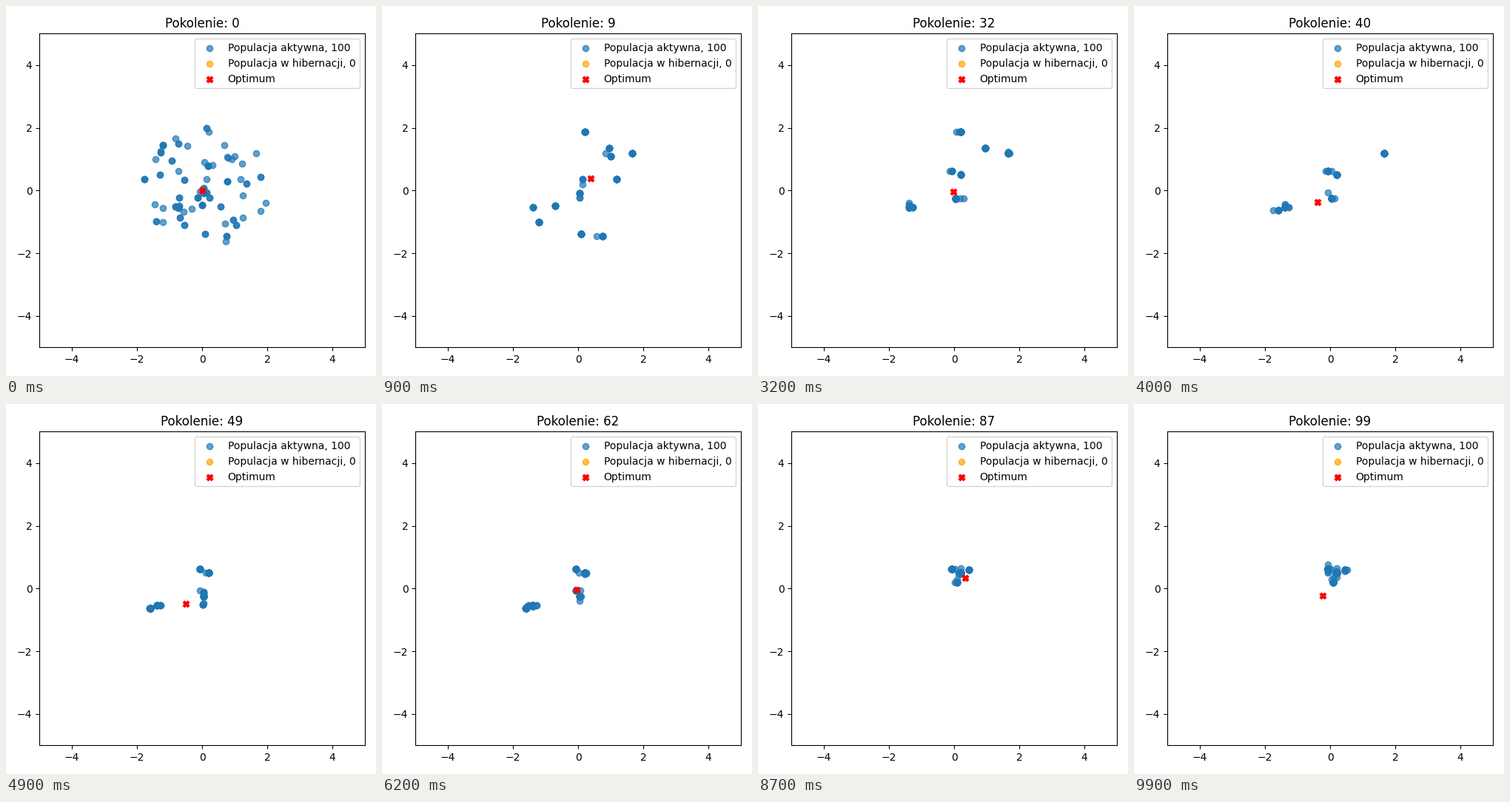
A matplotlib script that plays this animation: 500x500 px, repeating every 10000 ms.

```python
import numpy as np
import matplotlib.pyplot as plt
from matplotlib.animation import FuncAnimation

SIZE = 100          # individuals
GENERATIONS = 100
STRAYS = 49         # founders that soon die out
MOVE, COPY, MUTATE = 0.04, 0.12, 0.02   # chances per individual and generation

# x, y, first generation, generation of extinction
NICHES = np.array([
    (0.20, 1.87, 0, 40), (1.66, 1.19, 0, 42), (1.00, 1.10, 0, 26),
    (0.95, 1.35, 6, 38), (0.14, 0.36, 0, 26), (1.18, 0.36, 0, 18),
    (0.75, -1.45, 0, 16), (0.08, -1.38, 0, 26), (-1.20, -1.00, 0, 26),
    (-0.70, -0.48, 0, 15), (0.05, -0.08, 0, 16), (-1.38, -0.53, 6, 70),
    (0.04, -0.25, 14, 84), (-0.06, 0.62, 16, 100), (0.20, 0.50, 20, 100),
    (-1.59, -0.62, 36, 70), (0.02, -0.50, 43, 58), (-0.18, -0.25, 60, 86),
    (0.45, 0.60, 84, 100), (0.10, 0.20, 82, 100),
])


def scatter_strays(rng):
    r = 2 * rng.random(STRAYS) ** 0.6
    angle = rng.uniform(0, 2 * np.pi, STRAYS)
    end = rng.integers(2, 10, STRAYS)
    return np.column_stack([r * np.cos(angle), r * np.sin(angle), 0 * r, end])


def evolve(seed=7):
    rng = np.random.default_rng(seed)
    niches = np.vstack([NICHES, scatter_strays(rng)])
    spots, (born, dies) = niches[:, :2], niches[:, 2:].T

    founders = np.flatnonzero(born == 0)
    home = np.append(founders, rng.choice(founders, SIZE - len(founders)))
    pop = spots[home]
    history = [pop.copy()]
    for gen in range(1, GENERATIONS):
        alive = np.flatnonzero((born <= gen) & (gen < dies))
        for i in range(SIZE):
            roll = rng.random()
            if gen >= dies[home[i]] or roll < MOVE:
                home[i] = rng.choice(alive)
                pop[i] = spots[home[i]]
            elif roll < MOVE + COPY:
                pop[i] = pop[rng.choice(np.flatnonzero(home == home[i]))]
            elif roll < MOVE + COPY + MUTATE:
                axis = rng.integers(2)
                pop[i, axis] = spots[home[i], axis] + rng.normal(0, 0.1)
        history.append(pop.copy())
    return history


history = evolve()

fig, ax = plt.subplots(figsize=(5, 5), dpi=100)
ax.set(xlim=(-5, 5), ylim=(-5, 5))
active = ax.scatter(*history[0].T, alpha=0.7, label=f"Populacja aktywna, {SIZE}")
ax.scatter([], [], color="orange", alpha=0.7, label="Populacja w hibernacji, 0")
optimum = ax.scatter([0], [0], color="red", marker="X", label="Optimum")
title = ax.set_title("Pokolenie: 0")
ax.legend(loc="upper right")
fig.tight_layout()


def draw(gen):
    active.set_offsets(history[gen])
    shift = 0.5 * np.sin(0.1 * gen)
    optimum.set_offsets([[shift, shift]])
    title.set_text(f"Pokolenie: {gen}")
    return active, optimum, title


anim = FuncAnimation(fig, draw, frames=GENERATIONS, interval=100, repeat=True)
plt.show()
```
